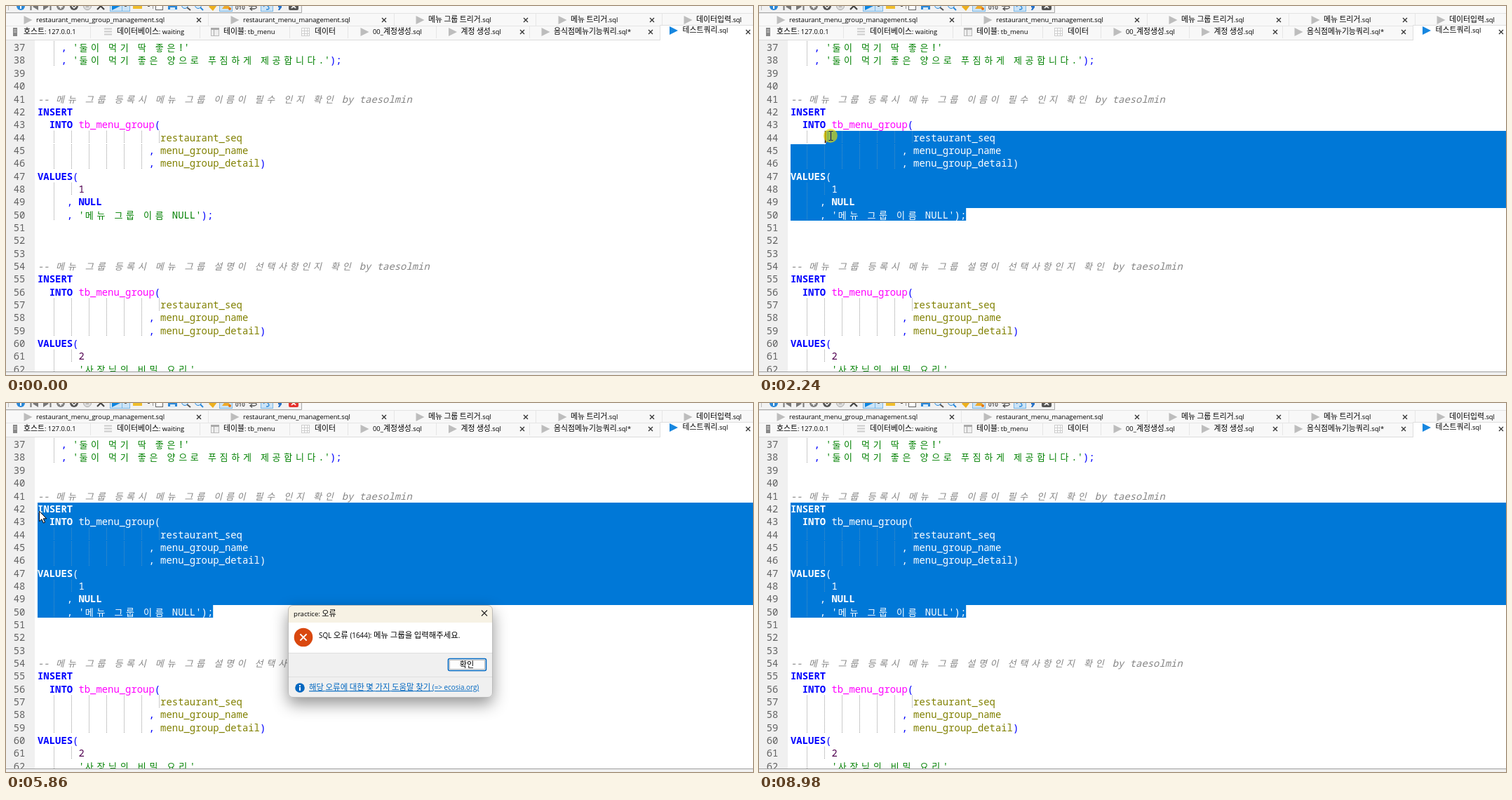
An HTML page for the animation above (9640 ms loop, 1065x526 px).

```html
<!DOCTYPE html>
<html lang="ko">
<head>
<meta charset="utf-8">
<title>SQL editor</title>
<style>
html, body { margin: 0; width: 100%; height: 100%; overflow: hidden; background: #fff; }
svg { display: block; width: 1065px; height: 526px; }
text { white-space: pre; }
.code text { font-family: "Noto Sans Mono", "Noto Sans CJK KR", monospace; font-size: 13.9px; }
.code .ko { font-family: "Noto Sans CJK KR", sans-serif; font-size: 13px; font-weight: 400; }
.kw { fill: #00f; font-weight: 700; }
.op { fill: #00f; }
.table { fill: #f0f; }
.column { fill: #808000; }
.string { fill: #008000; }
.number { fill: #500050; }
.comment { fill: #858585; font-style: italic; }
.lineno { fill: #626262; }
.code.selected text { fill: #fff; }
.guide { stroke: #999; stroke-dasharray: 1 1; }
.selected .guide { stroke: #4a90c4; }
.ui { font-family: "Open Sans", "Noto Sans CJK KR", sans-serif; }
.ui .ko { font-family: "Noto Sans CJK KR", sans-serif; }
.invert { mix-blend-mode: difference; }
</style>
</head>
<body>
<svg id="stage" viewBox="0 0 1065 526" xmlns="http://www.w3.org/2000/svg">
  <defs>
    <clipPath id="editorClip"><rect y="48" width="1065" height="473"/></clipPath>
    <clipPath id="selectionClip"><path id="selectionShape"/></clipPath>
  </defs>
  <rect width="1065" height="526" fill="#fff"/>
  <rect y="48" width="41" height="473" fill="#f0f0f0"/>
  <g clip-path="url(#editorClip)">
    <g id="code" class="code"></g>
    <path id="selection" fill="#0078d7"/>
    <g clip-path="url(#selectionClip)"><g id="selectedCode" class="code selected"></g></g>
  </g>
  <rect id="caret" class="invert" width="2" height="17" fill="#fff"/>
  <g id="chrome" class="ui"></g>
  <g id="dialog" class="ui"></g>
  <circle id="press" r="10" fill="#e6dc00" opacity=".65"/>
  <path id="beam" class="invert" fill="none" stroke="#aaa" d="M-3-6.5h2.5l.5.5.5-.5H3M0-6V6M-3 6.5h2.5L0 6l.5.5H3"/>
  <path id="arrow" fill="#fff" stroke="#000" stroke-linejoin="round" d="M0 0V14.5L3.4 11.4 5.7 16.8 8 15.8 5.7 10.6H10.2Z"/>
</svg>
<script>
const $ = id => document.getElementById(id);
const LOOP = 9640;
const LEFT = 45, COL = 8.34, ROW = 18.34, FIRST = 37;
const rowTop = n => 49.8 + (n - FIRST) * ROW;
const colX = c => LEFT + c * COL;
const isKorean = s => /[가-힣]/.test(s);
const runs = s => s.match(/[가-힣]+|[^가-힣]+/g);
const escape = s => s.replace(/&/g, '&amp;').replace(/</g, '&lt;').replace(/>/g, '&gt;');

// ---- Code: every glyph sits on a grid, Korean ones take two columns ----
let codeMarkup = '';

function put(n, col, kind, text) {
  const spans = runs(text).map(run => {
    const wide = isKorean(run);
    const xs = [...run].map(() => {
      const x = colX(col) + (wide ? 1 : 0);
      col += wide ? 2 : 1;
      return x.toFixed(1);
    });
    return `<tspan class="${wide ? 'ko' : ''}" x="${xs.join(' ')}">${escape(run)}</tspan>`;
  });
  codeMarkup += `<text class="${kind}" y="${(rowTop(n) + 14.3).toFixed(1)}">${spans.join('')}</text>`;
}

function guides(n, count) {
  const top = Math.round(rowTop(n));
  for (let i = 1; i <= count; i++)
    codeMarkup += `<path class="guide" d="M${Math.round(colX(3 * i) - 2) + .5} ${top}v18"/>`;
}

function listItem(n, col, kind, text, end = '') {
  guides(n, 1);
  put(n, col, 'op', ',');
  put(n, col + 2, kind, text);
  if (end) put(n, col + 2 + [...text].reduce((w, c) => w + (isKorean(c) ? 2 : 1), 0), 'op', end);
}

function insertStatement(n, comment, id) {
  put(n, 0, 'comment', comment);
  put(n + 1, 0, 'kw', 'INSERT');
  put(n + 2, 2, 'kw', 'INTO');
  put(n + 2, 7, 'table', 'tb_menu_group');
  put(n + 2, 20, 'op', '(');
  ['restaurant_seq', 'menu_group_name', 'menu_group_detail'].forEach((name, i) => {
    const row = n + 3 + i;
    guides(row, i ? 6 : 7);
    if (i) put(row, 19, 'op', ',');
    put(row, 21, 'column', name);
  });
  put(n + 5, 38, 'op', ')');
  put(n + 6, 0, 'kw', 'VALUES');
  put(n + 6, 6, 'op', '(');
  guides(n + 7, 2);
  put(n + 7, 7, 'number', id);
}

for (let n = FIRST; n <= 62; n++) put(n, -4.1, 'lineno', String(n));
listItem(37, 4, 'string', "'둘이 먹기 딱 좋은!'");
listItem(38, 4, 'string', "'둘이 먹기 좋은 양으로 푸짐하게 제공합니다.'", ');');
insertStatement(41, '-- 메뉴 그룹 등록시 메뉴 그룹 이름이 필수 인지 확인 by taesolmin', '1');
listItem(49, 5, 'kw', 'NULL');
listItem(50, 5, 'string', "'메뉴 그룹 이름 NULL'", ');');
insertStatement(54, '-- 메뉴 그룹 등록시 메뉴 그룹 설명이 선택사항인지 확인 by taesolmin', '2');
listItem(62, 5, 'string', "'사장님의 비밀 요리'");
$('code').innerHTML = $('selectedCode').innerHTML = codeMarkup;

// ---- Interface helpers ----
function label(x, y, text, size = 9.4, attrs = '') {
  const spans = runs(text).map(run => isKorean(run)
    ? `<tspan class="ko" font-size="${size * 1.155}">${run}</tspan>` : escape(run));
  return `<text x="${x}" y="${y + size * .37}" font-size="${size}" ${attrs}>${spans.join('')}</text>`;
}
const rect = (x, y, w, h, fill, attrs = '') =>
  `<rect x="${x}" y="${y}" width="${w}" height="${h}" fill="${fill}" ${attrs}/>`;
const disc = (x, y, r, fill, attrs = '') => `<circle cx="${x}" cy="${y}" r="${r}" fill="${fill}" ${attrs}/>`;
const line = (d, stroke, width = 1) => `<path d="${d}" fill="none" stroke="${stroke}" stroke-width="${width}"/>`;
const cross = (x, y, r, color, width = 1.2) =>
  line(`M${x - r} ${y - r}l${2 * r} ${2 * r}m0 ${-2 * r}l${-2 * r} ${2 * r}`, color, width);
const play = (x, y, fill) => `<path d="M${x} ${y - 6}l12 6-12 6z" fill="${fill}"/>`;

function toolbar() {
  const gray = '#777', blue = '#2b88d8';
  const pressed = (x, w) => rect(x + .5, -4.5, w, 12, '#cce4f7', 'stroke="#7ab8e8"');
  return rect(0, 0, 1065, 10, '#fafafa') + rect(0, 0, 421, 10, '#f2f2f2') +
    line('M0 9.5H421.5V0', '#a8a8a8') + line('M3.5 0V6', '#bbb') +
    disc(21, 0, 6, blue) + rect(20, 0, 2, 4, '#fff') +
    line('M35.5-3V6', gray, 2) + `<path d="M46-5V6L38 1z M53-5V6l8-5z" fill="${gray}"/>` + line('M63.5-3V6', gray, 2) +
    disc(78, 0, 6, '#808080') + line('M75 1h6M78-2v6', '#fff', 1.5) +
    disc(97, 0, 6, '#555') + line('M94 0l3 3 3-3', '#fff', 1.3) +
    disc(116, 0, 5.5, '#ddd', 'stroke="#aaa"') + line('M114 1h4', '#999') +
    cross(135, 0, 5, '#444', 2.2) +
    pressed(148, 28) + line('M165.5 0V7', '#7ab8e8') + play(151, 0, '#0b84e0') + rect(169, 0, 3, 1, '#555') +
    rect(181, -4, 13, 8, '#f0bd2b') + rect(202, 0, 3, 1, '#555') +
    rect(213.5, -4.5, 10, 10, '#fff', 'stroke="#666"') + line('M209.5-1v5', '#999') +
    rect(231, 0, 13, 5, blue) + rect(234, 2, 7, 4, '#d7ebfa') +
    disc(255, -1, 4.5, '#d7ebfa', `stroke="${blue}"`) + line('M258 2l5 4', '#555', 2) +
    disc(274, -1, 4.5, '#d7ebfa', `stroke="${blue}"`) + line('M277 2l4 4', blue, 2) +
    `<path d="M289 1l6-5 6 3-6 8z" fill="#edb01d"/>` +
    pressed(304, 18) + `<path d="M308 4l6-8 7 8z" fill="#efaa28"/>` + disc(319, 4, 2, '#e27513') +
    label(327, 2.5, '010', 8, 'fill="#333" font-weight="600"') +
    line('M346 0h10q3 3-2 4h-6m3-2.5l-3 2.5 3 2.5', '#555', 1.3) +
    pressed(363, 17) + line('M367 1q4-4 7 0t-3 4', blue, 1.3) +
    `<path d="M388-2h5v4l-3 4h-2l1.500-4H388z" fill="#2470c8"/>` +
    rect(403, -6, 14, 12, '#555', 'id="stop" rx="2"') + cross(410, 0, 3, '#fff', 1.6);
}

function tabs() {
  const file = (x, y, text) => play(x - 17.5, y, '#bdbdbd') + label(x, y, text);
  const close = (x, y) => cross(x, y, 3, '#333', 1.3);
  const top = 20, low = 37;
  return rect(0, 10, 1065, 38, '#f8f8f8') + line('M0 10.500H1065', '#e4e4e4') + line('M0 28.500H933', '#e6e6e6') +
    line('M288.500 11V28M553.500 11V28M755.500 11V28M935.500 11V28', '#e6e6e6') +
    line('M120.500 29V46M276.500 29V46M404.500 29V46M487.500 29V46M613.500 29V46M746.500 29V46', '#e6e6e6') +
    file(43, top, 'restaurant_menu_group_management.sql') + close(275, top) +
    file(338, top, 'restaurant_menu_management.sql') + close(539, top) +
    file(602, top, '메뉴 그룹 트리거.sql') + close(741, top) +
    file(805, top, '메뉴 트리거.sql') + close(921, top) +
    file(984, top, '데이터입력.sql') +
    rect(10, 31, 6, 12, '#888') + line('M11 34h4M11 37h4', '#ddd') + label(25, low, '호스트: 127.0.0.1') +
    line('M140 32.500h11M140 36.500h11M140 40.500h11', '#ccc', 2) + label(158, low, '데이터베이스: waiting') +
    rect(292.5, 31.5, 11, 11, '#eee', 'stroke="#bbb"') + rect(292, 31, 12, 3, '#aaa') + line('M296.500 34v8', '#aaa') +
    label(310, low, '테이블: tb_menu') +
    rect(421.5, 31.5, 11, 11, '#fff', 'stroke="#ccc"') + line('M425.500 32v10M429.500 32v10M422 35.500h10M422 39.500h10', '#ccc') +
    label(440, low, '데이터') +
    file(523, low, '00_계정생성.sql') +
    file(648.5, low, '계정 생성.sql') + close(736, low) +
    file(781, low, '음식점메뉴기능쿼리.sql*') + close(919, low) +
    rect(933, 27, 132, 21, '#fff') + line('M932.500 48V27.500H1065', '#dedede') +
    play(946, 35, '#1787e0') + label(964.5, 35, '테스트쿼리.sql') + close(1058, low) +
    line('M0 48.500H933', '#dcdcdc') +
    rect(0, 521, 1065, 5, '#f0f0f0') + line('M0 521.500H1065', '#a0a0a0');
}

function dialogBox() {
  const blue = '#0067c0';
  return `<g style="filter:drop-shadow(0 9px 11px rgba(0,0,0,.42))">${rect(402, 288, 292, 132, '#f0f0f0', 'rx="7"')}</g>` +
    `<path d="M402 313v-18q0-7 7-7h278q7 0 7 7v18z" fill="#f7f2e4"/>` +
    rect(402, 313, 292, 43, '#fff') + line('M402 356.500H694M402 390.500H694', '#dfdfdf') +
    rect(402.5, 288.5, 291, 131, 'none', 'rx="6.500" stroke="#a5a5a5" stroke-opacity=".7"') +
    label(410, 300, 'practice: 오류', 9.6) + cross(682, 299.5, 4, '#222', 1.1) +
    disc(424, 334, 13.3, '#d9480f') + cross(424, 334, 4.6, '#fff', 2) +
    label(446, 331, 'SQL 오류 (1644): 메뉴 그룹을 입력해주세요.', 9.9) +
    rect(630.5, 364.5, 54, 17, '#fdfdfd', `rx="2" stroke="${blue}" stroke-width="1.6"`) +
    rect(632.5, 366.5, 50, 13, 'none', 'stroke="#777" stroke-dasharray="1 1"') +
    label(657, 373, '확인', 9.6, 'text-anchor="middle"') +
    disc(419, 406, 6.8, blue) + rect(418, 405, 2, 5, '#fff') + rect(418, 402, 2, 2, '#fff') +
    label(432, 405.5, '해당 오류에 대한 몇 가지 도움말 찾기 (=> ecosia.org)', 9.9, `fill="${blue}" text-decoration="underline"`);
}

$('chrome').innerHTML = toolbar() + tabs();
$('dialog').innerHTML = dialogBox();

// ---- Motion ----
const DRAG = 1580, RELEASE = 3350, OPEN = 4660, CLOSE = 8450;
const path = [
  [70, 1003, 518], [210, 700, 400], [340, 420, 305], [480, 302, 268], [620, 302, 268], [900, 306, 285],
  [1300, 302, 300], [1580, 302, 301], [1840, 275, 281], [2240, 102, 185], [2510, 74, 166], [2650, 56, 158],
  [2790, 54, 157], [3060, 47, 154], [5860, 47, 154], [6200, 240, 232], [6820, 599, 349], [7020, 584, 361],
  [7200, 555, 370], [7570, 504, 324], [7710, 504, 324], [8100, 652, 372], [8350, 657, 372], [8450, 700, 390],
  [8650, 893, 470], [8780, 990, 530]
];
const lineEnds = { 42: 6, 43: 21, 44: 35, 45: 36, 46: 39, 47: 7, 48: 8, 49: 11, 50: 30 };
const clamp = (v, lo = 0, hi = 1) => Math.min(hi, Math.max(lo, v));
const show = (id, on) => $(id).setAttribute('visibility', on ? 'visible' : 'hidden');
const move = (id, x, y) => $(id).setAttribute('transform', `translate(${x.toFixed(2)} ${y.toFixed(2)})`);

function pointerAt(t) {
  const i = clamp(path.findIndex(p => p[0] > t), 1, path.length - 1);
  const [t0, x0, y0] = path[i - 1], [t1, x1, y1] = path[i];
  const k = clamp((t - t0) / (t1 - t0));
  return [x0 + (x1 - x0) * k, y0 + (y1 - y0) * k];
}

function caretAt(t) {
  const [x, y] = pointerAt(clamp(t, DRAG, 3060));
  const row = clamp(FIRST + Math.floor((y - rowTop(FIRST)) / ROW), 42, 50);
  const step = row >= 44 && row <= 46 && x < colX(19) ? 3 : 1;
  return [row, clamp(Math.round((x - LEFT) / COL / step) * step, 0, lineEnds[row])];
}

function selectionPath(row, col) {
  const x = colX(col), top = Math.round(rowTop(row));
  const last = Math.round(rowTop(50)), end = colX(lineEnds[50]);
  if (row === 50) return `M${x} ${last}H${end}V${last + 18}H${x}Z`;
  const next = Math.round(rowTop(row + 1));
  return `M${x} ${top}H1065V${last}H${end}V${last + 18}H${LEFT}V${next}H${x}Z`;
}

function caretVisible(t) {
  return (t >= DRAG && t < 3610) || (t >= 4140 && t < 4860) || (t >= CLOSE && t < 8980);
}

function drawDialog(t) {
  const opening = clamp((t - OPEN) / 270), closing = clamp((t - CLOSE) / 170);
  const scale = .8 + .2 * (1 - (1 - opening) ** 3) - .1 * closing;
  show('dialog', opening > 0 && closing < 1);
  $('dialog').setAttribute('transform', `translate(548 354) scale(${scale}) translate(-548 -354)`);
  $('dialog').setAttribute('opacity', Math.min(1, opening * 2.5) * (1 - closing));
}

function draw(t) {
  const [x, y] = pointerAt(t);
  const [row, col] = caretAt(t);
  const selection = t >= DRAG ? selectionPath(row, col) : '';
  $('selection').setAttribute('d', selection);
  $('selectionShape').setAttribute('d', selection);

  move('caret', Math.round(colX(col)) - 1, Math.round(rowTop(row)));
  show('caret', caretVisible(t));

  const modal = t >= OPEN && t < CLOSE;
  const pointing = t >= 70 && t < 8780;
  move('beam', Math.round(x) + .5, Math.round(y));
  move('arrow', x, y);
  move('press', x, y);
  show('beam', pointing && !modal);
  show('arrow', pointing && modal);
  show('press', t >= DRAG && t < RELEASE);

  $('stop').setAttribute('fill', modal ? '#e5322d' : '#555');
  drawDialog(t);
}

const start = performance.now();
function tick() {
  draw((performance.now() - start) % LOOP);
  requestAnimationFrame(tick);
}
tick();
</script>
</body>
</html>
```
